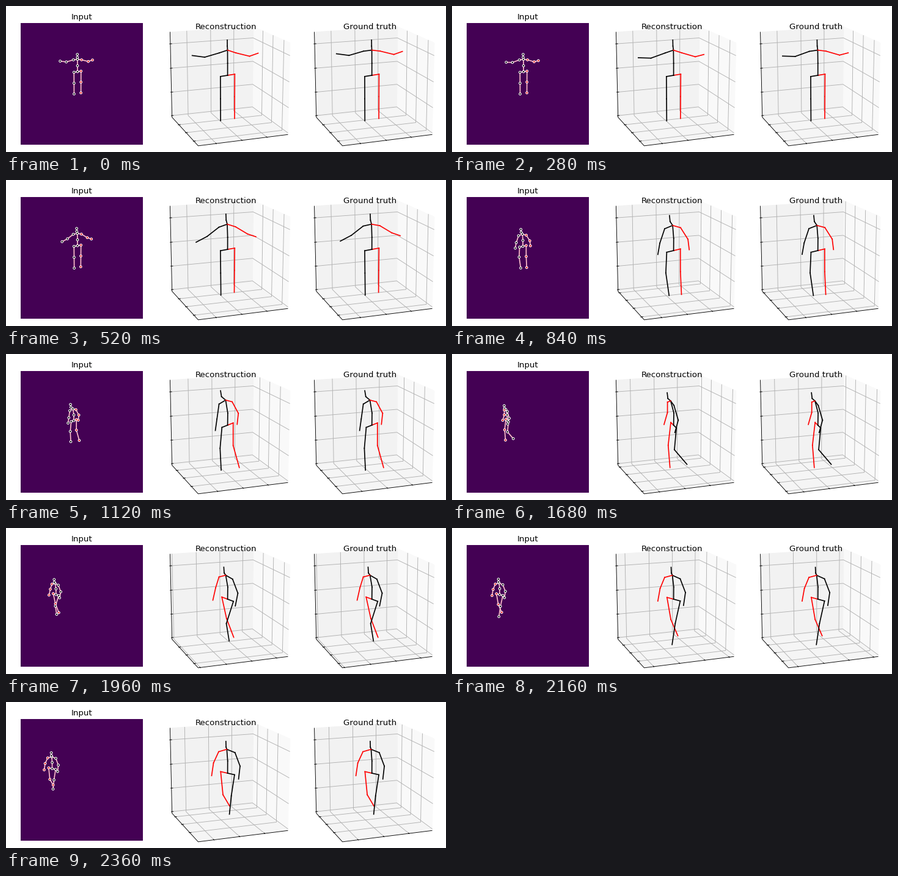
These frames come from a looping animation (720 by 240 pixels, 2.4 s). A matplotlib script:

```python
import numpy as np
import matplotlib.pyplot as plt
from matplotlib.animation import FuncAnimation
from matplotlib.collections import LineCollection

W, H = 720, 240
FRAMES, STEP = 60, 40
RADIUS = 1.7                # metres covered by each 3D box
EDGE = 0.5 + 1 / 48         # half size of the panes, in box units
SCALE = 200 / 0.185
REC_X, GT_X, BOX_Y = 362.6, 598.7, 125.3

# Joints: hip, right leg, left leg, spine to head, left arm, right arm
PARENTS = [-1, 0, 1, 2, 0, 4, 5, 0, 7, 8, 9, 8, 11, 12, 8, 14, 15]
RIGHT = {1, 2, 3, 14, 15, 16}
JOINT_COLORS = ["red" if j in RIGHT else "black" for j in range(17)]

# Perspective camera; U points right and AWAY into the scene on the ground
azim, elev, dist = np.radians(70), np.radians(15), 7.5
N = np.array([np.cos(azim) * np.cos(elev), np.sin(azim) * np.cos(elev),
              np.sin(elev)])
U = np.array([-np.sin(azim), np.cos(azim), 0])
V = np.cross(N, U)
AWAY = np.array([-np.cos(azim), -np.sin(azim), 0])
UP = np.array([0, 0, 1])


def project(points, cx):
    p = np.array(points, float)
    k = SCALE / (dist - p @ N)
    return np.column_stack([cx + k * (p @ U), BOX_Y - k * (p @ V)])


def sigmoid(x):
    return 1 / (1 + np.exp(-x))


def turn(t):
    """Share of the half turn done at t seconds."""
    return sigmoid((t - 1.5) / 0.3)


def facing(t):
    """Forward and rightward ground directions."""
    a = np.radians(175) * turn(t)
    return (np.cos(a) * AWAY - np.sin(a) * U,
            np.cos(a) * U + np.sin(a) * AWAY)


def walking(t):
    return sigmoid((t - 0.78) / 0.08)


def arms_out(t):
    return sigmoid((0.58 - t) / 0.11)


def limb(start, parts, fwd, out):
    """Chain of (length, sideways angle, forward angle) hanging from start."""
    points = [start]
    for length, side, swing in parts:
        a, f = np.radians([side, swing])
        step = (np.cos(f) * (np.sin(a) * out - np.cos(a) * UP)
                + np.sin(f) * fwd)
        points.append(points[-1] + length * step)
    return points


def leg(t, hip, peak, fwd, out):
    """One leg; its knee is bent most at time peak of each stride."""
    phase = 2 * np.pi * (t - peak) / 1.04
    knee = walking(t) * (12 + 45 * max(0, np.cos(phase)))
    thigh = walking(t) * (5 + 14 * np.cos(phase - 0.9))
    side = -10 * turn(t)
    return limb(hip, [(0.45, side, thigh), (0.45, side, thigh - knee)],
                fwd, out)


def skeleton(t, shrug):
    """Joints in metres around the centre of the box."""
    fwd, right = facing(t)
    look = facing(t + 0.25)[0]
    raised = arms_out(t)

    root = (0.138 - 0.037 * walking(t)) * UP
    hip = 0.138 * right + 0.022 * UP
    thorax = root + 0.485 * UP + 0.06 * fwd
    spine = (root + thorax) / 2 - 0.035 * fwd
    nose = thorax + 0.062 * UP + 0.085 * look
    head = nose + 0.115 * UP + 0.02 * look
    neck = thorax - (0.055 - shrug * raised) * UP

    return np.array([
        root,
        *leg(t, root + hip, 1.33, fwd, right),
        *leg(t, root - hip, 1.82, fwd, -right),
        spine, thorax, nose, head,
        *limb(neck - 0.16 * right,
              [(0.29, 18 + 58 * raised, -10), (0.25, -3 + 98 * raised, 15)],
              fwd, -right),
        *limb(neck + 0.16 * right,
              [(0.27, 26 + 52 * raised, -10),
               (0.25, 5 + 92 * raised, 15 + 30 * raised)],
              fwd, right)])


# The root walks along the facing direction
seconds = np.arange(FRAMES) * STEP / 1000
speed = [0.97 * walking(t) * facing(t)[0] for t in seconds]
path = np.cumsum(speed, axis=0) * STEP / 1000
ORIGIN = np.array([-0.042, -0.125, 0])


def ticks(center):
    """Multiples of half a metre within the box, in box units."""
    lo, hi = center - RADIUS / 2, center + RADIUS / 2
    marks = np.arange(np.ceil(lo / 0.5), np.floor(hi / 0.5) + 1) * 0.5
    return (marks - center) / RADIUS


def box_lines(root, cx):
    E, out, inn = EDGE, EDGE + 0.1 / 12, EDGE - 0.2 / 12
    grid, marks = [], []
    for x in ticks(root[0]):
        grid.append([(x, E, -E), (x, -E, -E), (x, -E, E)])
        marks.append([(x, out, -E), (x, inn, -E)])
    for y in ticks(root[1]):
        grid.append([(E, y, -E), (-E, y, -E), (-E, y, E)])
        marks.append([(out, y, -E), (inn, y, -E)])
    for z in ticks(RADIUS / 2):
        grid.append([(E, -E, z), (-E, -E, z), (-E, E, z)])
        marks.append([(out, -E, z), (inn, -E, z)])
    return [project(g, cx) for g in grid], [project(m, cx) for m in marks]


def bones(pose):
    return [pose[[j, PARENTS[j]]] for j in range(1, 17)]


fig = plt.figure(figsize=(9, 3), dpi=80, facecolor="white")
ax = fig.add_axes([0, 0, 1, 1])
ax.set_xlim(0, W)
ax.set_ylim(H, 0)
ax.axis("off")


def lines(color, width, z):
    lc = LineCollection([], colors=color, linewidths=width, zorder=z,
                        capstyle="projecting")
    return ax.add_collection(lc, autolim=False)


class Box:
    def __init__(self, cx):
        self.cx = cx
        E = EDGE
        walls = [
            ("#f9f9f9", [(-E, -E, -E), (-E, E, -E), (-E, E, E), (-E, -E, E)]),
            ("#f2f2f2", [(-E, -E, -E), (E, -E, -E), (E, -E, E), (-E, -E, E)]),
            ("#f5f5f5", [(-E, -E, -E), (E, -E, -E), (E, E, -E), (-E, E, -E)]),
        ]
        for color, corners in walls:
            ax.add_patch(plt.Polygon(project(corners, cx), fc=color, ec=color,
                                     lw=1, zorder=1))
        self.grid = lines("#b0b0b0", 0.8, 2)
        self.marks = lines("black", 0.8, 3)
        self.body = lines(JOINT_COLORS[1:], 1.5, 4)
        axis = project([(E, -E, E), (E, -E, -E), (E, E, -E), (-E, E, -E)], cx)
        ax.plot(*axis.T, color="black", lw=0.8, zorder=3)

    def update(self, root, body):
        grid, marks = box_lines(root, self.cx)
        pose = project(body / RADIUS, self.cx)
        self.grid.set_segments(grid)
        self.marks.set_segments(marks)
        self.body.set_segments(bones(pose))
        return pose


ax.add_patch(plt.Rectangle((24, 28), 200, 200, fc="#440154", ec="none"))
limbs = lines("pink", 1.5, 4)
dots = ax.scatter(np.zeros(17), np.zeros(17), 10, color=JOINT_COLORS,
                  edgecolors="white", linewidths=1, zorder=10)
rec_box, gt_box = Box(REC_X), Box(GT_X)

for x, y, title in [(124, 22, "Input"), (360, 38, "Reconstruction"),
                    (596, 38, "Ground truth")]:
    ax.text(x, y, title, ha="center", va="baseline", fontsize=12,
            family="DejaVu Sans", zorder=12)


def update(frame):
    t, moved = seconds[frame], path[frame]
    root = ORIGIN + moved
    rec_box.update(root, skeleton(t, 0))
    pose = gt_box.update(root, skeleton(t, 0.035))

    # The flat view is the same pose, smaller, following the root
    zoom = 0.49 / (1 + 0.15 * moved @ AWAY)
    center = np.array([117 + 42.4 * moved @ U, 108 + 1.5 * walking(t)])
    flat = center + zoom * (pose - pose[0])
    limbs.set_segments(bones(flat))
    dots.set_offsets(flat)
    return []


anim = FuncAnimation(fig, update, frames=FRAMES, interval=STEP,
                     repeat=True, repeat_delay=0, blit=False)
plt.show()
```
